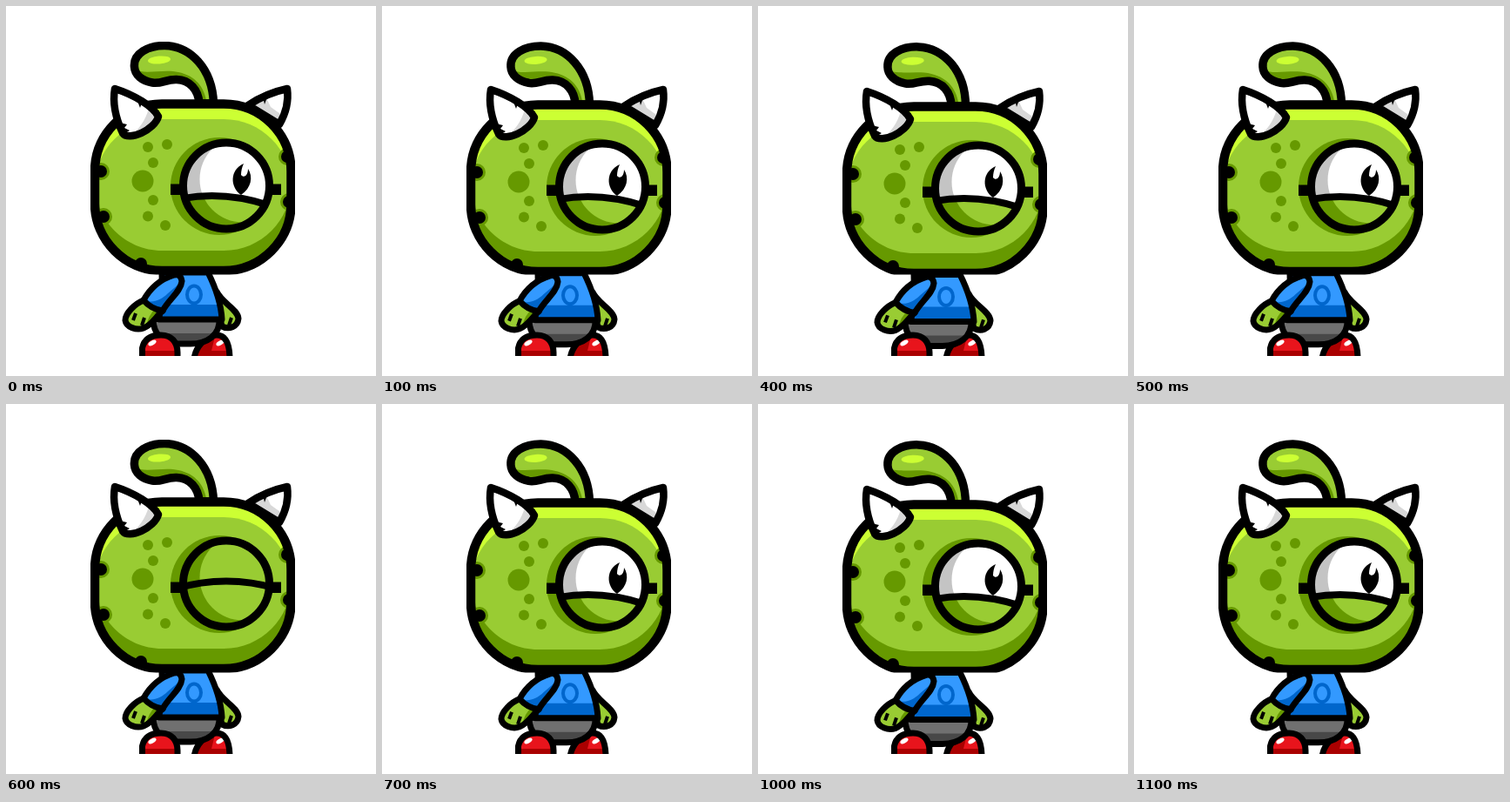
Animation of 425x425 px, one loop 1200 ms. Source, as an HTML page with a canvas:

```html
<!DOCTYPE html>
<html lang="en">
<head>
<meta charset="utf-8">
<title>Idle alien</title>
<style>
html, body { margin: 0; width: 100%; height: 100%; overflow: hidden; background: #fff; }
canvas { display: block; width: 425px; height: 425px; }
</style>
</head>
<body>
<canvas id="stage" width="425" height="425"></canvas>
<script>
const ctx = document.getElementById('stage').getContext('2d');
const LOOP = 1200, STEP = 100, BOB = 600;
const INK = '#000', GREEN = '#9c3', DARK = '#690', LIME = '#cf3';
const BLUE = '#39f', NAVY = '#06c', BONE = '#fff', SHADE = '#d8d8d8';

const shapes = {
  tail: 'M147.500 70C146 54 164 45.500 182 45.500C212 46 237 72 238.500 112H222C221 96 211 85 196 84.500C184 84 178 90 168 88C156 86 148 79 147.500 70Z',
  tailShade: 'M146 72C158 80 180 72 198 76C218 80 229 94 231 114H215L196 92H155Z',
  head: 'M179 112.500H250C293 112.500 327.500 147 327.500 190V227C327.500 269 293 304 250 304H179C137 304 102 269 102 227V190C102 147 137 112.500 179 112.500Z',
  horn: 'M125 95C122 112 127 131 134 146C141 156 171 142 175 127C169 115 147 102 125 95Z',
  hornShade: 'M143 150C152 142 160 132 164 118L182 126L160 152Z',
  cracks: 'M126 133L139 136L136 140L142 143L134 148ZM149 104L154 117L157 108Z',
  backHorn: 'M323 95C309 98 293 104 278 114L314 136C321 124 325 110 323 95Z',
  backHornShade: 'M270 112L298 103L304 116L318 126L312 140Z',
  backCracks: 'M295 104L297 113L301 102ZM324 107L319 113L324 116Z',
  torso: 'M179 306H232C240 322 247 340 248 360H176C177 340 180 325 179 306Z',
  pants: 'M169 359.500H245C246 378 231 388 212 388H196C181 388 169 377 169 359.500Z',
  sleeve: 'M193 309C177 314 165 325 158 338C164 345 172 349 180 350C187 337 201 328 202 316C201 309 197 308 193 309Z',
  sleeveShade: 'M155 336C165 342 176 340 186 330L200 318V352H170Z',
  hand: 'M158 338C148 342 137 353 137 361C138 369 150 373 158 370C168 366 172 357 180 350Z',
  fingers: 'M146 361L149 353M156 367L159 358',
  backHand: 'M242 328C248 341 266 348 267 359C266 369 256 372 248 368L244 350Z',
  backFingers: 'M256 367L259 358',
  shoe: 'M156.500 406V393C159 381 169 378 178 378C190 378 197 386 197 398V406Z',
  shoeShade: 'M150 396H200V406H150Z',
  backShoe: 'M216 406C217 393 229 378 242 378C252 378 257 388 257 406Z',
  backShoeShade: 'M212 406V380H240L236 396H260V406Z',
  pupil: 'M273 181C257 188 257 208 270 217C282 209 284 196 278 187C278 195 273 198 270 194C270 190 271 185 273 181Z',
  lid: 'M198 222Q252 211 308 231V264H198Z',
  lidLine: 'M198 222Q252 211 308 231',
  shutLine: 'M195 212Q253 195 311 212'
};
for (const key in shapes) shapes[key] = new Path2D(shapes[key]);

function fill(path, color) {
  ctx.fillStyle = color;
  ctx.fill(path);
}

function line(path, width, color = INK) {
  ctx.lineWidth = width;
  ctx.strokeStyle = color;
  ctx.stroke(path);
}

function oval(x, y, rx, ry = rx, turn = 0) {
  const p = new Path2D();
  p.ellipse(x, y, rx, ry, turn, 0, Math.PI * 2);
  return p;
}

function dot(x, y, r, color) {
  fill(oval(x, y, r), color);
}

function box(x, y, w, h) {
  const p = new Path2D();
  p.rect(x, y, w, h);
  return p;
}

function lower(path, dy) {
  const p = new Path2D();
  p.addPath(path, new DOMMatrix([1, 0, 0, 1, 0, dy]));
  return p;
}

function within(path, draw) {
  ctx.save();
  ctx.clip(path);
  draw();
  ctx.restore();
}

// Flat shape with inner shading and an ink outline
function part(path, color, width, shade) {
  fill(path, color);
  if (shade) within(path, shade);
  line(path, width);
}

function drawShoe(path, shade, glintX) {
  part(path, '#e8141c', 7, () => {
    fill(shade, '#a00');
    fill(oval(glintX, 387, 5, 2.5, -0.5), '#fff');
  });
}

function drawBody(dy) {
  drawShoe(shapes.backShoe, shapes.backShoeShade, 246);
  ctx.save();
  ctx.translate(0, dy);
  part(shapes.backHand, GREEN, 7);
  line(shapes.backFingers, 4);
  part(shapes.pants, '#707070', 7, () => fill(box(165, 376, 85, 15), '#484848'));
  part(shapes.torso, BLUE, 7, () => {
    fill(box(170, 343, 80, 20), NAVY);
    line(oval(216, 331.5, 8, 10), 4, NAVY);
  });
  part(shapes.hand, GREEN, 7, () => fill(oval(172, 360, 8, 16, 0.5), DARK));
  line(shapes.fingers, 4);
  part(shapes.sleeve, BLUE, 7, () => fill(shapes.sleeveShade, NAVY));
  ctx.restore();
  drawShoe(shapes.shoe, shapes.shoeShade, 168);
}

function drawTail(dy) {
  ctx.save();
  ctx.translate(232, 112 + dy);
  ctx.rotate(dy * 0.011);
  ctx.translate(-232, -112);
  part(shapes.tail, GREEN, 9.5, () => fill(shapes.tailShade, DARK));
  fill(oval(176, 62, 13, 4.5, -0.08), LIME);
  ctx.restore();
}

function drawNub(x, y) {
  dot(x, y, 10, DARK);
  dot(x, y, 7, INK);
}

function drawEye(shut) {
  const ball = oval(253, 206.5, 49.5);
  const lit = color => dot(272, 199, 49.5, color);
  dot(245, 207, 56, DARK);
  within(ball, () => {
    fill(ball, shut ? DARK : '#c4c4c4');
    lit(shut ? GREEN : BONE);
    if (shut) return;
    fill(shapes.pupil, INK);
    fill(shapes.lid, DARK);
    within(shapes.lid, () => lit(GREEN));
    line(shapes.lidLine, 8);
  });
  line(ball, 9);
  if (shut) line(shapes.shutLine, 8);
  fill(box(189, 204.5, 14, 12.5), INK);
  fill(box(303, 204.5, 13, 12.5), INK);
}

function shadeHead() {
  fill(box(97, 208, 235, 100), DARK);
  within(lower(shapes.head, 17.5), () => fill(lower(shapes.head, -23), GREEN));
  drawNub(109, 190);
  drawNub(112, 242);
  drawNub(155, 296);
  drawNub(323, 173);
  drawNub(325, 225);
}

function drawHead(dy, shut) {
  ctx.save();
  ctx.clip(box(97, 41, 235, 267.5));
  drawTail(dy);
  ctx.translate(0, dy);
  part(shapes.backHorn, BONE, 8.5, () => {
    fill(shapes.backHornShade, SHADE);
    fill(shapes.backCracks, INK);
  });
  part(shapes.head, LIME, 10.5, shadeHead);
  for (const [x, y] of [[163, 162], [185, 159], [169, 180], [169, 223], [163, 241.5], [183, 252]]) {
    dot(x, y, 6, DARK);
  }
  dot(157, 201, 12.5, DARK);
  drawEye(shut);
  part(shapes.horn, BONE, 8.5, () => {
    fill(shapes.hornShade, SHADE);
    fill(shapes.cracks, INK);
  });
  ctx.restore();
}

function draw(now) {
  const t = Math.floor((now % LOOP) / STEP) * STEP;
  const dy = 2 * (1 - Math.cos(t / BOB * Math.PI * 2));
  ctx.fillStyle = '#fff';
  ctx.fillRect(0, 0, 425, 425);
  ctx.save();
  ctx.clip(box(97, 41, 235, 361));
  drawBody(dy * 0.8);
  drawHead(dy, t === 600);
  ctx.restore();
}

ctx.lineJoin = 'round';
const start = performance.now();
function tick() {
  draw(performance.now() - start);
  requestAnimationFrame(tick);
}
tick();
</script>
</body>
</html>
```
